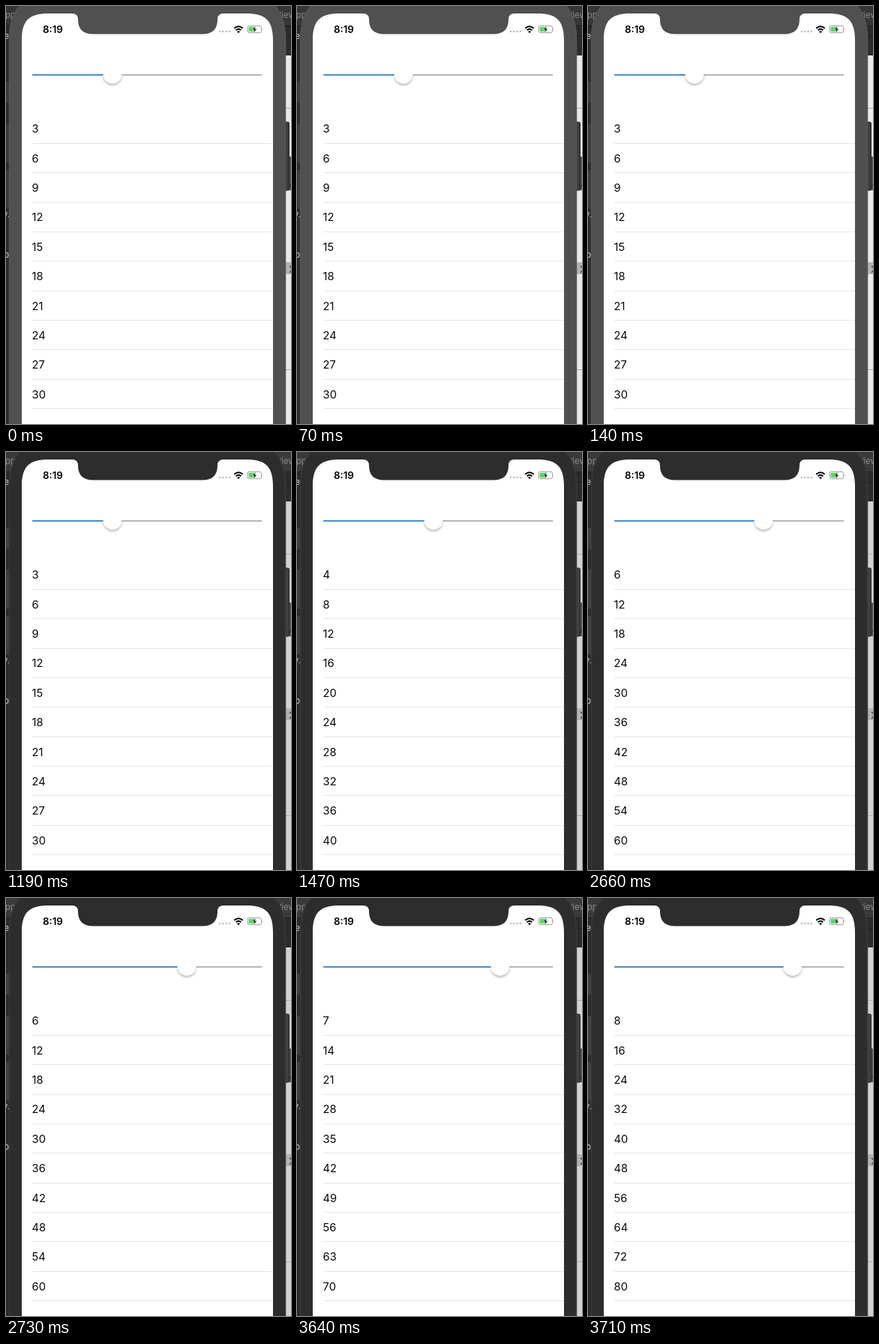
These frames come from a looping animation (380 by 558 pixels, 4.76 s). An HTML page:

```html
<!DOCTYPE html>
<html lang="en">
<head>
<meta charset="utf-8">
<style>
  html, body { margin: 0; height: 100%; overflow: hidden; background: #2b2b2b; }
  svg { display: block; width: 380px; height: 558px; --bezel: #505050; --rim: #565656; --paper: #e9e9e9; --bar: #363636; --button: #3c3c3c; }
  svg.dim { --bezel: #2d2d2d; --rim: #3b3b3b; --paper: #d2d2d2; --bar: #3a3a3a; --button: #404040; }
  text { font-family: Inter, Roboto, sans-serif; }
  .label { font-size: 11px; fill: #8c8c8c; }
  .bright { fill: #dcdcdc; }
  .time { font-size: 13.3px; font-weight: 600; }
  #rows text { font-size: 14.7px; fill: #080808; }
  #rows path { stroke: #e6e6e6; }
</style>
</head>
<body>
<svg id="stage" viewBox="0 0 380 558">
  <defs>
    <filter id="shadow" x="-50%" y="-50%" width="200%" height="200%">
      <feDropShadow dx="0" dy="2.2" stdDeviation="1.5" flood-color="#000" flood-opacity=".3"/>
    </filter>
    <clipPath id="below"><path d="M0 90H380V120H0Z"/></clipPath>
  </defs>

  <!-- desktop behind the phone -->
  <path d="M0 0H380V558H0Z" fill="#2b2b2b"/>
  <path d="M0 0H380V26H0Z" fill="var(--bar)"/>
  <path d="M0 26.5H380M360 40.5H380" stroke="#1d1d1d"/>
  <path d="M360 66H380V558H360Z" fill="var(--paper)"/>
  <path d="M370 136.5H380M370 485.5H380" stroke="#a9a9a9"/>
  <path d="M370 342H380V358H370Z" fill="#b4b4b4"/>
  <path d="M373 201H380V246H373Z" fill="#555"/>
  <path d="M378 347l4 4-4 5M377 243l4-7" fill="none" stroke="#333" stroke-width="1.2"/>
  <g class="label">
    <text x="-1" y="16">pp</text>
    <text x="360" y="16">View</text>
    <text class="bright" x="-2.5" y="44">e</text>
    <text class="bright" x="-4" y="282">v.</text>
    <text class="bright" x="-2.5" y="336">o</text>
  </g>
  <g fill="var(--button)" stroke="#222">
    <rect x="-2" y="100" width="7" height="30"/>
    <rect x="-2" y="156" width="7" height="54"/>
    <rect x="-2" y="218" width="7" height="53"/>
    <rect x="371" y="155" width="6.5" height="91" rx="1.5"/>
  </g>

  <!-- phone -->
  <path d="M4.5 560V44C4.5 24 9 10 20-2H357C368 10 372.5 24 372.5 44V560Z" fill="var(--bezel)" stroke="var(--rim)" stroke-width="1.5"/>
  <path d="M21 558V46C21 20 30 10 57 10H88Q96 10 96 18C96 31 103 37.5 116 37.5H262C275 37.5 282 31 282 18Q282 10 290 10H320C347 10 356 20 356 46V558Z" fill="#fff"/>

  <!-- status bar -->
  <text class="time" x="49" y="35.7">8:19</text>
  <path d="M285 34H299" stroke="#bdbdbd" stroke-width="2.6" stroke-linecap="round" stroke-dasharray="0 4.3"/>
  <g fill="none" stroke="#000" stroke-width="2">
    <path d="M304.3 29.8Q310 24.6 315.7 29.8M306.6 32.3Q310 29.2 313.4 32.3"/>
    <path d="M310 36.2l-2-2.1q2-1.7 4 0Z" fill="#000" stroke="none"/>
  </g>
  <rect x="322" y="26.3" width="18.5" height="9.4" rx="2.4" fill="#fff" stroke="#9b9b9b"/>
  <rect x="323.5" y="27.8" width="9" height="6.4" rx="1" fill="#5fd36b"/>
  <path d="M341.8 29.4q1.6 1.6 0 3.2Z" fill="#9b9b9b"/>
  <path d="M333 26.5l-4.6 5.2h2.7l-1.2 4.3 4.6-5.4h-2.7Z" fill="#000" stroke="#fff" stroke-width=".5"/>

  <!-- slider -->
  <g fill="none" stroke-width="2" stroke-linecap="round">
    <path d="M36 92H340.5" stroke="#b8b8b8"/>
    <path id="fill" stroke="#4a8fc7"/>
  </g>
  <g clip-path="url(#below)"><circle id="knob" cy="91" r="12.5" fill="#fff" filter="url(#shadow)"/></g>

  <g id="rows"></g>
</svg>
<script>
  const LOOP = 4760, DIM_AT = 1190;
  // [start time, knob x]
  const drag = [[0, 142], [1470, 182], [1540, 187.7], [2660, 234], [2730, 241], [3640, 271], [3710, 273]];
  const $ = id => document.getElementById(id);

  $('rows').innerHTML = Array.from({ length: 10 }, (_, i) => {
    const y = i * 39.35;
    return `<text x="34.6" y="${169.4 + y}"></text><path d="M35 ${Math.round(183 + y) + .5}H356"/>`;
  }).join('');
  const cells = document.querySelectorAll('#rows text');

  function draw(now) {
    const t = now % LOOP;
    const x = drag.findLast(step => step[0] <= t)[1];
    const factor = Math.floor((x - 48) / 28);
    $('stage').classList.toggle('dim', t >= DIM_AT);
    $('knob').setAttribute('cx', x);
    $('fill').setAttribute('d', `M36 92H${x}`);
    cells.forEach((cell, i) => cell.textContent = factor * (i + 1));
  }

  const start = performance.now();
  function frame() {
    draw(performance.now() - start);
    requestAnimationFrame(frame);
  }
  frame();
</script>
</body>
</html>
```
